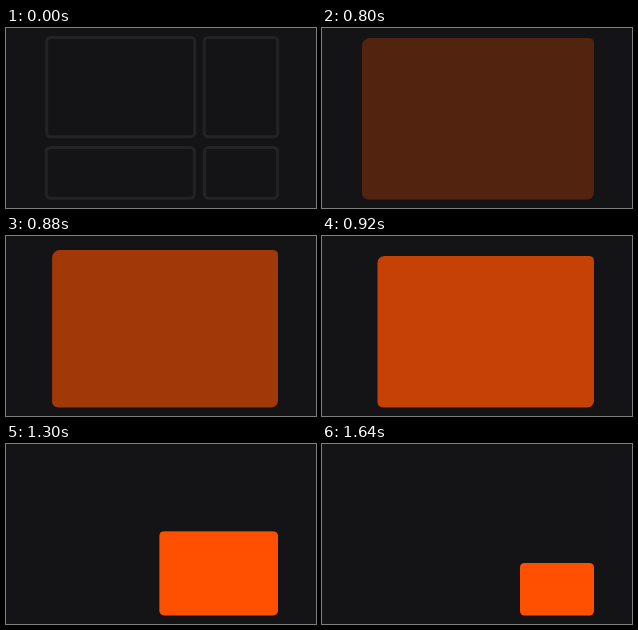
These frames come from a looping animation (310 px wide and 180 px high, 3580 ms). An HTML page:

```html
<!DOCTYPE html>
<html lang="en">
<head>
<meta charset="utf-8">
<title>Grid to tile</title>
<style>
  :root { --loop: 3580ms; }
  html, body {
    margin: 0;
    width: 100%;
    height: 100%;
    overflow: hidden;
    background: #141416;
  }
  svg, .tile {
    position: absolute;
    left: 0;
    top: 0;
    width: 310px;
    height: 180px;
  }
  svg {
    fill: none;
    stroke: #232325;
    stroke-width: 3;
    animation: grid var(--loop) linear infinite;
  }
  .tile {
    background: #ff5000;
    animation: tint var(--loop) linear infinite, shrink var(--loop) linear infinite;
  }

  @keyframes grid {
    0%, 21.228% { opacity: 1; }
    21.229% { opacity: .55; }
    22.346%, 100% { opacity: 0; }
  }

  /* starts abruptly, then fades in */
  @keyframes tint {
    0%, 21.228% { opacity: 0; }
    21.229% { opacity: .08; }
    23.464% { opacity: .44; }
    25.698% { opacity: .75; }
    27.933%, 100% { opacity: 1; }
  }

  /* bottom right corner stays put; the curves join at equal speed */
  @keyframes shrink {
    0%, 23.464% {
      clip-path: inset(10px 38px 8.5px 40px round 8px 5px 7px 6px);
      animation-timing-function: cubic-bezier(.333, .168, .667, .537);
    }
    25.698% {
      clip-path: inset(19.7px 38px 8.5px 55px round 7.5px 5px 6.5px 6px);
      animation-timing-function: cubic-bezier(.333, .297, .667, .676);
    }
    29.609% {
      clip-path: inset(47.2px 38px 8.5px 96px round 6.5px 5px 6px 6px);
      animation-timing-function: cubic-bezier(.333, .399, .667, .719);
    }
    36.313% {
      clip-path: inset(87px 38px 8.5px 153px round 5px);
      animation-timing-function: cubic-bezier(.333, .505, .667, .861);
    }
    45.81%, 100% {
      clip-path: inset(119px 38px 8.5px 198px round 4.5px);
    }
  }
</style>
</head>
<body>
<svg viewBox="0 0 310 180">
  <rect x="40.7" y="9.5" width="148" height="99.3" rx="4"/>
  <rect x="198.2" y="9.5" width="73.5" height="99.3" rx="4"/>
  <rect x="40.3" y="119.5" width="148" height="50.8" rx="4"/>
  <rect x="198.5" y="119.5" width="73" height="50.8" rx="4"/>
</svg>
<div class="tile"></div>
</body>
</html>
```
